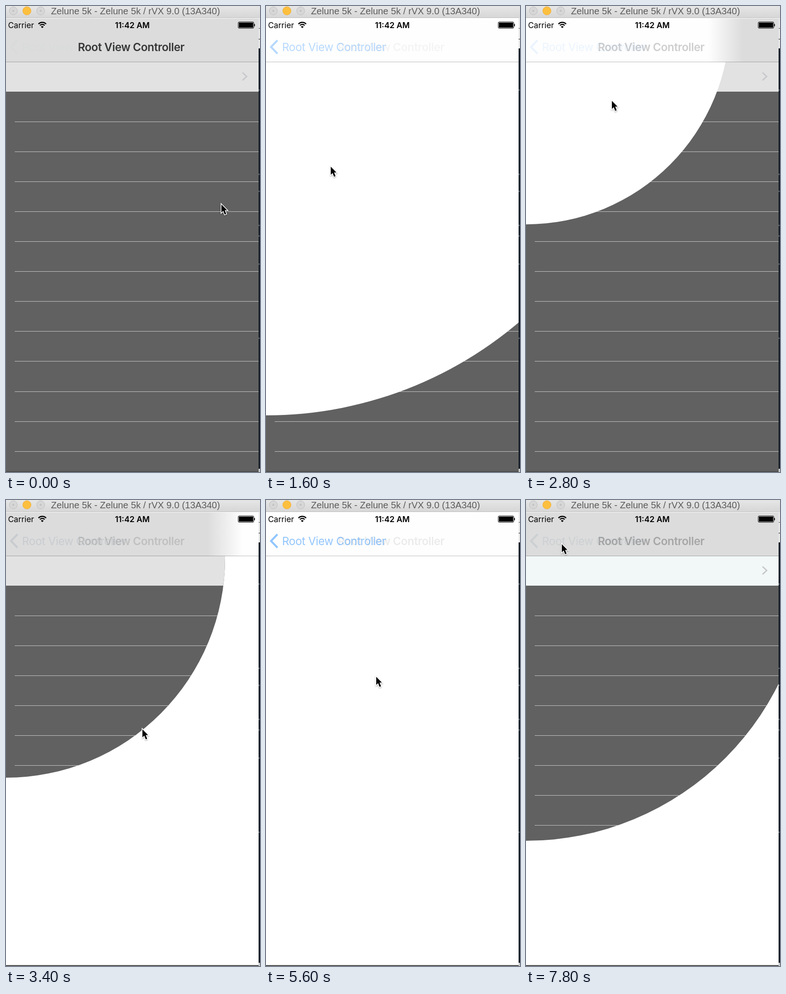
An HTML page with a canvas for the animation above (8000 ms loop, 553 by 1012 pixels).

```html
<!DOCTYPE html>
<html lang="en">
<head>
<meta charset="utf-8">
<title>Circle navigation transition</title>
<style>
  html, body { margin: 0; width: 100%; height: 100%; overflow: hidden; background: #fff; }
  canvas { display: block; width: 553px; height: 1012px; }
</style>
</head>
<body>
<canvas id="stage" width="553" height="1012"></canvas>
<script>
const ctx = document.getElementById('stage').getContext('2d');
const LOOP = 8000, STEP = 200;
const W = 550, NAV_TOP = 27, NAV_BOTTOM = 122, BOTTOM = 1010;
const BLUE = '#007aff', DIM = '#42637f', NAV_GREY = '#dcdcdc';

// Each action lasts until the next one starts.
const actions = [
  [-467, 'pop'], [250, 'push'], [830, 'pop'], [1230, 'push'], [2000, 'pop'], [2607, 'push'],
  [3200, 'drag'], [3900, 'cancel'], [4600, 'drag'], [5300, 'cancel'], [7533, 'pop'],
].map(([start, kind]) => ({ start, kind }));

// Pointer path: time, x, y
const path = [
  [0, 469, 431], [250, 300, 155], [500, 200, 260], [830, 70, 92], [1230, 120, 155],
  [1600, 141, 349], [2000, 70, 92], [2607, 175, 158], [2800, 187, 206], [3200, 12, 300],
  [3400, 297, 498], [3800, 330, 605], [4200, 90, 260], [4600, 80, 163], [5200, 300, 661],
  [5600, 240, 384], [6200, 490, 431], [6900, 440, 380], [7400, 90, 105], [7800, 78, 96], [8000, 78, 96],
];

function pointerAt(t) {
  const i = path.findIndex(p => p[0] > t);
  const [t0, x0, y0] = path[i - 1], [t1, x1, y1] = path[i];
  const k = (t - t0) / (t1 - t0);
  return { x: x0 + (x1 - x0) * k, y: y0 + (y1 - y0) * k };
}

function dragRadius(t) {
  const p = pointerAt(t);
  return Math.hypot(p.x, p.y - 126) + 1;
}

const fadeOut = d => Math.exp(-d / 115);
const fadeIn = (d, span) => Math.min(1, d / span) ** 2;

// The circle reveals `inside`; the other screen lies around it.
function stateAt(t) {
  const { start, kind } = actions.findLast(a => a.start <= t);
  const d = t - start, grown = 2.3 * d;
  const pull = { inside: 'root', cy: 126, backColor: BLUE };
  switch (kind) {
    case 'push':
      return { inside: 'detail', r: grown, cy: 22 + 0.0188 * grown, backColor: BLUE,
               back: fadeIn(d, 700), title: fadeOut(d) };
    case 'pop':
      return { ...pull, r: grown, back: fadeOut(d), title: fadeIn(d, 540),
               backColor: d > 0 ? DIM : BLUE };
    case 'drag': {
      const r = d > 0 ? dragRadius(t) : 0, p = r / 1150;
      return { ...pull, r, back: Math.exp(-5 * p), title: 0.3 * p, backColor: DIM };
    }
    default:
      return { ...pull, r: dragRadius(start) * Math.max(0, 1 - d / 250),
               back: fadeIn(d, 460), title: fadeOut(d) };
  }
}

function rect(color, x, y, w, h) {
  ctx.fillStyle = color;
  ctx.fillRect(x, y, w, h);
}

function line(color, width, points) {
  ctx.beginPath();
  points.forEach(([x, y]) => ctx.lineTo(x, y));
  ctx.strokeStyle = color;
  ctx.lineWidth = width;
  ctx.stroke();
}

function disc(x, y, r, fill, stroke) {
  ctx.beginPath();
  ctx.arc(x, y, r, 0, 2 * Math.PI);
  ctx.fillStyle = fill;
  ctx.fill();
  if (!stroke) return;
  ctx.strokeStyle = stroke;
  ctx.lineWidth = 1;
  ctx.stroke();
}

function text(str, x, y, font, color, align = 'left', spacing = 0) {
  ctx.font = font;
  ctx.textAlign = align;
  ctx.letterSpacing = spacing + 'px';
  ctx.fillStyle = color;
  ctx.fillText(str, x, y);
}

function drawScreen(name, rowColor) {
  if (name === 'detail') return rect('#fff', 0, NAV_BOTTOM, W, BOTTOM - NAV_BOTTOM);
  rect('#616161', 0, NAV_BOTTOM, W, BOTTOM - NAV_BOTTOM);
  rect(rowColor, 0, NAV_BOTTOM, W, 64);
  line('#c7c7cb', 2.8, [[515, 144.5], [524, 153], [515, 161.5]]);
  for (let i = 0; i < 12; i++) rect('#c6c6c6', 19, Math.round(250.6 + i * 65.1), W - 19, 1);
}

function drawNav(s) {
  const shade = name => name === 'root' ? NAV_GREY : '#fefefe';
  const outside = s.inside === 'root' ? 'detail' : 'root';
  const edge = Math.sqrt(Math.max(0, s.r ** 2 - (NAV_BOTTOM - s.cy) ** 2));
  if (s.r === 0) {
    ctx.fillStyle = shade(outside);
  } else {
    const blur = ctx.createLinearGradient(edge - 38, 0, edge + 38, 0);
    blur.addColorStop(0, shade(s.inside));
    blur.addColorStop(1, shade(outside));
    ctx.fillStyle = blur;
  }
  ctx.fillRect(0, NAV_TOP, W, NAV_BOTTOM - NAV_TOP);
  rect('rgba(0,0,0,.27)', 0, 121, W, 1);

  const label = 'Root View Controller';
  ctx.globalAlpha = s.title;
  text(label, 272.5, 98, '600 24.2px Inter, sans-serif', '#000', 'center', -0.4);
  ctx.globalAlpha = s.back;
  text(label, 35, 98, '400 24.2px Inter, sans-serif', s.backColor, 'left', -0.4);
  line(s.backColor, 4.4, [[25, 74.5], [11, 89], [25, 103.5]]);
  ctx.globalAlpha = 1;
}

function drawStatusBar() {
  text('Carrier', 4.5, 48, '400 17.3px Inter, sans-serif', '#000');
  text('11:42 AM', 275, 48, '600 17.4px Inter, sans-serif', '#000', 'center');
  // Signal fan
  ctx.strokeStyle = '#000';
  ctx.lineWidth = 2.4;
  for (const r of [7, 11.5]) {
    ctx.beginPath();
    ctx.arc(79, 47, r, -Math.PI * 0.76, -Math.PI * 0.24);
    ctx.stroke();
  }
  ctx.beginPath();
  ctx.moveTo(79, 48);
  ctx.arc(79, 48, 4.2, -Math.PI * 0.76, -Math.PI * 0.24);
  ctx.fillStyle = '#000';
  ctx.fill();
  // Battery
  ctx.beginPath();
  ctx.roundRect(505.5, 34.5, 34, 14, 2.5);
  ctx.lineWidth = 1;
  ctx.stroke();
  rect('#000', 507, 36, 31, 11);
  rect('#000', 540.5, 39, 1.5, 5);
}

function drawWindow() {
  const bar = ctx.createLinearGradient(0, 0, 0, 26);
  bar.addColorStop(0, '#e6e6e6');
  bar.addColorStop(1, '#d6d6d6');
  rect(bar, 0, 0, 553, 26);
  rect('#bcbcbc', 0, 25, W, 1);
  for (const x of [16, 75.5]) {
    disc(x, 10.5, 8.7, '#d7d7d7', '#bdbdbd');
    disc(x, 10.5, 2.2, '#c3c3c3');
  }
  disc(45.5, 10.5, 9, '#fdbf3f', '#eeb03c');
  text('Zelune 5k - Zelune 5k / rVX 9.0 (13A340)', 98, 18,
       '20.2px "Liberation Sans", Arial, sans-serif', '#5c5c5c');

  // Sliver of the desktop behind the window
  rect('#e8e8e8', W, 26, 3, 66);
  rect('#555', W, 48, 3, 1);
  rect('#777', W, 71, 3, 2);
  rect('#18212b', W, 92, 3, 913);
  rect('#0d1319', W, 92, 1, 913);
  for (const y of [181, 364, 401, 475, 498, 559, 720]) rect('#59636c', W, y, 2, 3);
  rect('#c9c9c9', W, 1005, 3, 7);
  rect('#4c4c4c', 0, BOTTOM, W, 2);
}

function drawPointer({ x, y }) {
  const arrow = new Path2D('M0 0V17.5L4 13.8L7.2 21.8L10.4 20.4L7.2 12.6H12.4Z');
  ctx.save();
  ctx.translate(x, y);
  ctx.shadowColor = 'rgba(0,0,0,.3)';
  ctx.shadowBlur = 3;
  ctx.shadowOffsetY = 1.5;
  ctx.strokeStyle = '#fff';
  ctx.lineWidth = 3;
  ctx.stroke(arrow);
  ctx.shadowColor = 'transparent';
  ctx.fillStyle = '#000';
  ctx.fill(arrow);
  ctx.restore();
}

function draw(t) {
  const s = stateAt(t);
  const rowColor = t > 7400 ? '#f2f7f7' : '#e2e2e2';
  rect('#fff', 0, 0, 553, 1012);
  drawScreen(s.inside === 'root' ? 'detail' : 'root', rowColor);
  ctx.save();
  ctx.beginPath();
  ctx.arc(0, s.cy, s.r, 0, 2 * Math.PI);
  ctx.clip();
  drawScreen(s.inside, rowColor);
  ctx.restore();
  drawNav(s);
  drawStatusBar();
  drawWindow();
  drawPointer(pointerAt(t));
}

const origin = performance.now();
function tick() {
  const t = Math.max(0, performance.now() - origin) % LOOP;
  draw(Math.floor(t / STEP) * STEP);
  requestAnimationFrame(tick);
}
tick();
</script>
</body>
</html>
```
